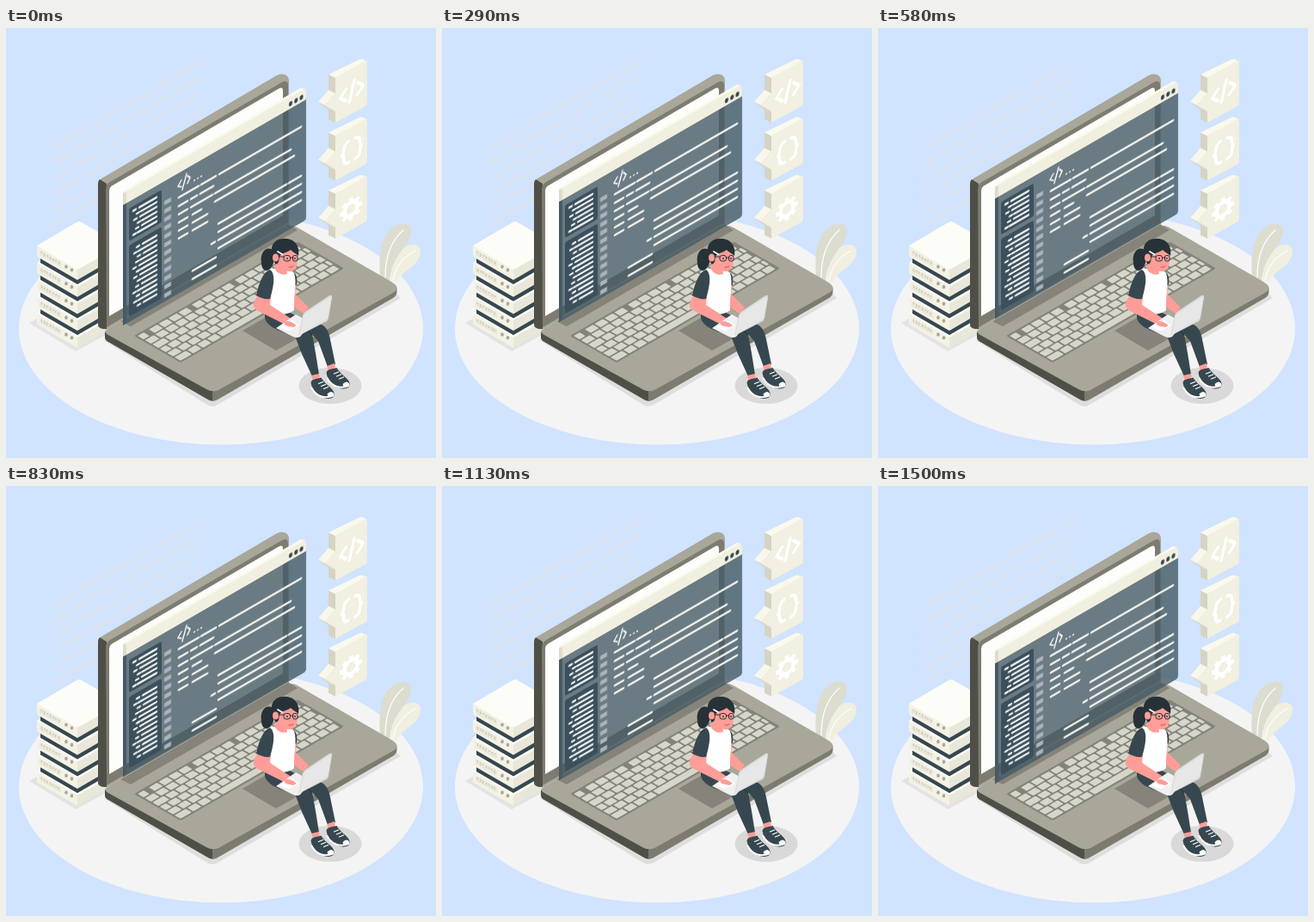
Write an HTML page that moves like this. It is 500 px wide and 500 px high and loops after 1.54 s.

```html
<!DOCTYPE html>
<html lang="en">
<head>
<meta charset="utf-8">
<title>Isometric coding desk</title>
<style>
  html, body { margin: 0; width: 100%; height: 100%; overflow: hidden; background: #d0e3ff; }
  svg { display: block; width: 100vw; height: 100vh; }
  #panel { animation: float 1540ms linear infinite; }
  @keyframes float {
    0%, 100% { transform: translateY(0); }
    45.8% { transform: translateY(-9.1px); }
    95.8% { transform: translateY(.8px); }
  }
  .line { fill: none; stroke-linecap: round; stroke-linejoin: round; }
  #wall { font: 14.2px 'Liberation Sans', Arial, sans-serif; fill: #dfe0e4; }
</style>
</head>
<body>
<svg viewBox="0 0 500 500">
  <ellipse cx="250" cy="349.500" rx="235" ry="135" fill="#f4f4f4"/>

  <g id="wall" transform="matrix(1 -.577 0 1 53 145)"></g>

  <!-- shadows -->
  <path d="M27 343 L85 310 L142 343 L81 376Z" fill="#e3e3e3"/>
  <path d="M112 362 L232 437 Q240 443 248 437 L459 314 L445 300 L240 405Z" fill="#dedede"/>
  <ellipse cx="377" cy="416" rx="36.500" ry="21" fill="#d9d9d9"/>

  <g id="servers"></g>

  <!-- plant -->
  <path d="M448 292 C446 272 455 256 470 252 C481 250 485 258 480 268 C475 279 460 283 454 296Z" fill="#f0efe0"/>
  <path d="M435 289 C433 262 436 236 457 228 C469 226 473 232 470 241 C466 257 448 265 446 295Z" fill="#dcdccf"/>
  <path class="line" d="M441 290 C441 265 448 247 462 235 M450 293 C453 277 463 265 476 259" stroke="#fff" stroke-width="1.200"/>

  <!-- laptop base -->
  <path d="M115 353 V360 Q115 363 119 365 L233 431 Q237 434 241 434 V416Z" fill="#504f47"/>
  <path d="M240 416 V434 Q244 434 248 431 L450 314 Q454.500 311 454.500 307 V302Z" fill="#7d7b6f"/>
  <path d="M118 350 L324 231 Q332 228 339 232 L448 295 Q460 302 450 308 L247 421 Q240 424 233 420 L119 357 Q112 353 118 350Z" fill="#a9a799"/>
  <path d="M133 341 L328 228 L339 235 L145 347Z" fill="#85837a"/>
  <path d="M275 352 L318 327 L358 350 L314 375Z" fill="#85837a"/>
  <g id="keys" transform="matrix(1 -.577 1 .577 149 358)">
    <rect width="190" height="54" rx="2" fill="#84837a"/>
  </g>

  <!-- laptop lid -->
  <path d="M107 181 Q107 177 111 175 L315 55 Q321 52 326 55 Q329 57 329 62 V228 L118 350 Q108 351 107 346Z" fill="#a9a799"/>
  <path d="M107 181 Q107 178 109 176 L117 181 V350 Q107 350 107 345Z" fill="#504f47"/>
  <path d="M116 188 Q116 182 121 179 L321 63 Q328 60 328 67 V226 L117 348Z" fill="#7e7c70"/>
  <path d="M120 190 Q120 185 124 183 L318 70 Q322 68 322 73 V218 L120 335Z" fill="#fdfdfb"/>

  <g id="boxes"></g>

  <!-- floating window -->
  <g id="panel">
    <g transform="matrix(1 -.577 0 1 136 192)">
      <path d="M0 13 H213 V151 Q213 154 210 154 H0Z" fill="#455a64" opacity=".8"/>
      <path d="M0 13 H4 V152 L0 154Z" fill="#455a64"/>
      <path d="M0 0 Q0 -2 3 -2 H207 Q213 0 213 5 V14 H0Z" fill="#f1f0e0"/>
      <path d="M0 -1 L3 -3 H207 L211 0 H4Z" fill="#fbfaef"/>
      <path d="M0 0 L4 1 V14 H0Z" fill="#dddccb"/>
      <g fill="#37474f">
        <ellipse cx="195" cy="8.500" rx="2" ry="2.800"/>
        <ellipse cx="201.300" cy="8.500" rx="2" ry="2.800"/>
        <ellipse cx="207.500" cy="8.500" rx="2" ry="2.800"/>
      </g>
      <rect x="7" y="22" width="38" height="38" rx="2" fill="#3b505c"/>
      <rect x="7" y="65" width="38" height="83" rx="2" fill="#3b505c"/>
      <g id="menu" class="line" stroke="#fff" stroke-width="2.300"></g>
      <g id="tags" fill="#a9b4bb"></g>
      <path class="line" d="M68 24 L64 29 L68 32 M74 20 L69 36 M75 23 L78 27 L75 32" stroke="#fff" stroke-width="1.500"/>
      <path class="line" d="M83 33h.1 M87 33h.1 M91 33h.1" stroke="#fff" stroke-width="1.800"/>
      <g id="code" class="line" stroke="#fafaf4" stroke-width="2.500"></g>
    </g>
  </g>

  <!-- coder -->
  <g>
    <path d="M310 258 C302 253 295 262 297 273 C297 280 301 284 306 281 C312 276 313 266 312 260Z" fill="#263238"/>
    <path d="M301 333 C299 346 316 352 336 358 L344 379 L356 405 L364 403 L360 378 L356 356 L363 364 L374 394 L383 391 L377 362 C374 344 364 342 350 341 L326 329Z" fill="#37474f"/>
    <path class="line" d="M356 357 C352 351 346 352 341 350" stroke="#263238"/>
    <path d="M355 404 L364 402 L365 409 L357 410Z M373 393 L382 390 L383 397 L375 399Z" fill="#ff9d98"/>
    <g id="shoe" transform="translate(-.5 1.500)">
      <path d="M355 411 C356 406 361 407 367 405 C371 413 381 417 382 423 C384 431 371 431 365 426 L357 419Z" fill="#37474f"/>
      <path class="line" d="M356 417 C361 427 371 430 381 426" stroke="#fff" stroke-width="2"/>
      <path class="line" d="M364 412l5-2 M367 415l5-2 M370 418l5-2" stroke="#fff" stroke-width="1.300"/>
      <path d="M374 424 Q379 419 382 424 Q382 428 375 427Z" fill="#fff"/>
    </g>
    <use href="#shoe" x="18" y="-11.500"/>
    <path d="M331 283 C337 285 339 291 338 299 L336 309 L352 325 L346 332 L325 318Z" fill="#ff9d98"/>
    <path d="M328 282 C338 283 339 289 338 299 L330 302Z" fill="#37474f"/>
    <path d="M306 281 C317 278 330 279 335 285 C339 297 334 310 335 328 C328 335 310 334 303 329 C307 312 301 297 306 281Z" fill="#fff"/>
    <path d="M312 275 L326 277 L327 286 Q319 289 313 281Z" fill="#ff9d98"/>
    <path d="M293 311 C287 318 286 324 291 328 L327 346 L339 347 L336 341 L307 322 L308 312Z" fill="#ff9d98"/>
    <path d="M307 281 C299 284 294 296 291 311 Q299 316 307 315 C311 301 314 286 307 281Z" fill="#37474f"/>
    <path d="M312 258 C320 253 334 253 338 260 C340 270 339 281 332 283 C323 284 314 278 312 270Z" fill="#ff9d98"/>
    <path d="M309 262 C307 250 315 244 325 245 C336 245 342 254 340 265 C337 262 334 261 331 258 C326 262 320 261 318 266 L317 272 Q314 277 312 272Z" fill="#263238"/>
    <ellipse cx="313.500" cy="267" rx="3.500" ry="4.500" fill="#ff9d98"/>
    <path class="line" d="M316 260 L321 263" stroke="#fff" stroke-width="1.800"/>
    <path class="line" d="M317 266 L323 266 M331 267 L334 267" stroke="#263238"/>
    <g fill="none" stroke="#263238">
      <rect x="323" y="264.500" width="7.500" height="6.500" rx="2.500"/>
      <rect x="333.500" y="264.500" width="5.500" height="6.500" rx="2"/>
    </g>
    <path class="line" d="M327 267.500v1 M336 267.500v1" stroke="#263238" stroke-width="1.400"/>
    <path class="line" d="M329 278 Q332 279 334 277" stroke="#b85a58"/>
    <path d="M314 349 L337 333 L355 343 L342 359 Q338 361 334 359Z" fill="#f0f0f0"/>
    <path d="M318 348 L333 340 L341 346 L329 352Z" fill="#fff"/>
    <path d="M323 342 Q330 339 338 346 L334 348 L325 346Z" fill="#ff9d98"/>
    <path d="M340 358 L345 334 Q346 331 349 329 L376 311 Q380 310 379 314 L375 338 Q374 341 371 342Z" fill="#d9d9d9"/>
    <path d="M341 357 L346 334 Q347 332 349 331 L376 313 Q378 312 378 315 L374 337 Q373 339 371 340Z" fill="#e7e7e7"/>
  </g>
</svg>
<script>
const NS = 'http://www.w3.org/2000/svg';
const get = id => document.getElementById(id);
const add = (parent, tag, attrs) => {
  const el = document.createElementNS(NS, tag);
  for (const k in attrs) el.setAttribute(k, attrs[k]);
  return parent.appendChild(el);
};
const path = (parent, d, fill) => add(parent, 'path', { d, fill });
const stroke = (parent, x1, x2, y) => add(parent, 'path', { d: `M${x1} ${y}H${x2}` });
let seed = 11;
const rand = () => (seed = seed * 16807 % 2147483647) / 2147483647;

// faint binary digits on the back wall
for (let row = 0; row < 6; row++) {
  const bits = Array.from({ length: 23 }, () => rand() < .5 ? 0 : 1);
  add(get('wall'), 'text', { x: 0, y: row * 18 }).textContent = bits.join('');
}

// server stack, bottom first
for (let i = 4; i >= 0; i--) {
  const g = add(get('servers'), 'g', { transform: `translate(0 ${i * 19.7})` });
  if (i < 4) path(g, 'M40 264 L83 289 L128 263 V272 L83 298 L40 273Z', '#37474f');
  path(g, 'M36 253 L83 280 V293 L38 267 Q36 266 36 264Z', '#f3f2e5');
  path(g, 'M83 280 L131 253 V265 L83 293Z', '#e8e7d9');
  path(g, 'M36 253 L82 226 Q85 224 88 226 L131 251 V254 L85 280 Q83 281 81 280Z', '#fdfdf8');
  path(g, 'M39 258 L64 272 V278 L39 264Z', '#e9e8da');
  for (let k = 0; k < 7; k++) {
    const x = 41 + k * 3.3 + rand();
    add(g, 'path', { d: `M${x} ${x * .577 + 236}v${2 + rand() * 2}`, stroke: '#c4c2b2' });
  }
  for (const x of [70, 76.5]) add(g, 'ellipse', { cx: x, cy: x * .577 + 237.2, rx: 1.8, ry: 2.2, fill: '#aaa89a' });
}

// keyboard
for (let row = 0; row < 6; row++) {
  let x = 2;
  for (let k = 0; x < 186; k++) {
    let w = k ? 9.6 : 7 + row % 3 * 3;
    if (row == 5 && k == 4) w = 56;
    w = Math.min(w, 188 - x);
    add(get('keys'), 'rect', { x, y: 2 + row * 8.6, width: w, height: 7, rx: 1, fill: '#d6d7ca' });
    x += w + (row == 0 && k % 4 == 0 ? 6 : 1.8);
  }
}

// icon boxes
const icons = [
  g => add(g, 'path', { d: 'M12 22 L5 29 L12 36 M22 17 L16 40 M26 22 L33 29 L26 36' }),
  g => add(g, 'path', { d: 'M15 17 Q9 18 9 25 Q9 29 7 30 Q9 31 9 35 Q9 42 15 42 M23 17 Q29 18 29 25 Q29 29 31 30 Q29 31 29 35 Q29 42 23 42' }),
  g => {
    add(g, 'circle', { cx: 18, cy: 30, r: 8, 'stroke-width': 5 });
    for (let a = 0; a < 360; a += 45)
      add(g, 'path', { d: 'M18 20V16.500', transform: `rotate(${a} 18 30)`, 'stroke-width': 5, 'stroke-linecap': 'butt' });
  }
];
icons.forEach((draw, i) => {
  const g = add(get('boxes'), 'g', { transform: `translate(0 ${i * 67.4})` });
  path(g, 'M375 54 L383 58 V110 L375 106Z', '#d5d4c4');
  path(g, 'M375 54 L411 36.500 Q413 35.500 415 36.500 L420 39 L383 58Z', '#faf9ee');
  path(g, 'M383 58 L418 38 Q420 37 420 40 V87 Q420 90 418 91 L383 110Z', '#f1f0e1');
  path(g, 'M363 86 L375 72 L383 76 L371 90Z', '#f8f7ea');
  path(g, 'M363 86 L371 90 L383 94 V98 L375 95Z', '#d9d8c8');
  path(g, 'M371 90 L383 76 V97Z', '#f1f0e1');
  draw(add(g, 'g', { class: 'line', transform: 'matrix(.95 -.54 0 .98 384 56)', stroke: '#fff', 'stroke-width': 3.8 }));
});

// window contents: [start, end, row]
const rows = (v, n, step) => Array.from({ length: n }, (_, i) => v + i * step);
[...rows(27.5, 6, 5.6), ...rows(72, 13, 5.7)].forEach((v, i) => {
  const x = 12 + [0, 4, 1, 5, 3][i % 5];
  stroke(get('menu'), x, x + 3, v);
  stroke(get('menu'), x + 7 - i % 2 * 2, 39, v);
});
for (const y of rows(37, 12, 9.8)) add(get('tags'), 'rect', { x: 48, y, width: 8, height: 5 });
[
  [65, 88, 42.5], [91, 108, 42.5], [112, 207, 42.5],
  [65, 75, 52.5], [79, 86, 52.5], [90, 105, 52.5],
  [65, 75, 62], [79, 104, 62], [107, 195, 62],
  [65, 75, 71.5], [81, 91, 71.5], [107, 199, 71.5],
  [65, 75, 81], [81, 98, 81], [65, 75, 90], [81, 98, 90],
  [111, 190, 99.5], [193, 207, 99.5],
  [111, 207, 109], [103, 107, 118.5], [111, 207, 118.5], [111, 207, 128],
  [81, 108, 137], [81, 108, 146.5]
].forEach(l => stroke(get('code'), ...l));
</script>
</body>
</html>
```
